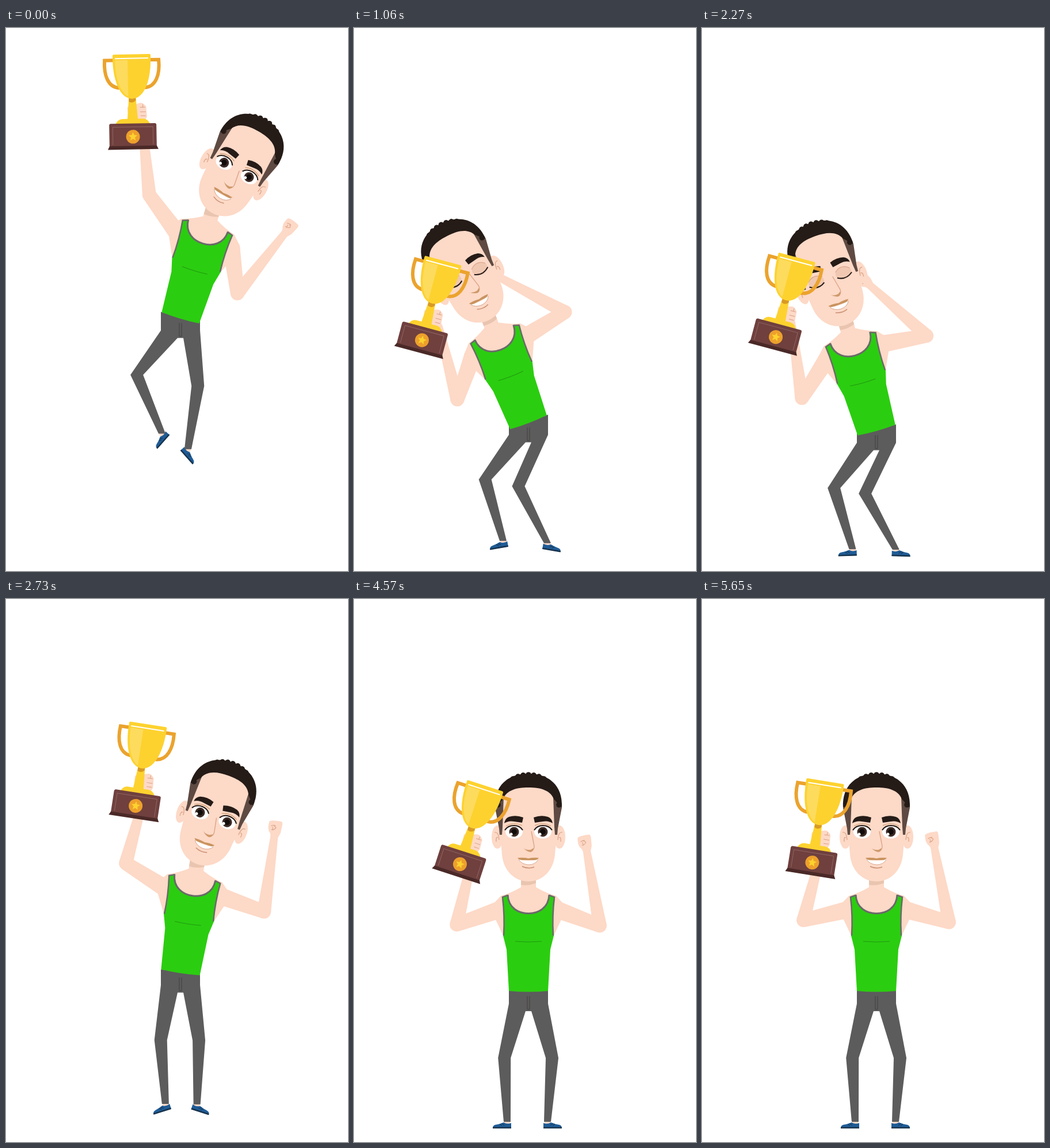
An HTML page with a canvas that plays this animation: 594x942 px, repeating every 5.72 s.

```html
<!DOCTYPE html>
<html lang="en">
<head>
<meta charset="utf-8">
<title>Winner's jump</title>
<style>
  html, body { margin: 0; width: 100%; height: 100%; overflow: hidden; background: #fff; }
  canvas { display: block; width: 594px; height: 942px; }
</style>
</head>
<body>
<canvas id="stage" width="594" height="942"></canvas>
<script>
const ctx = document.getElementById('stage').getContext('2d');
const LOOP = 5720, STEP = 66.5, CYCLE = 18.6, GROUND = 907;
const UPPER_ARM = 79, FOREARM = 145, THIGH = 91, SHIN = 111;
const SKIN = '#fdd9c7', CREASE = '#d9a184', HAIR = '#251b17', FADE = '#5e4a42';
const PANTS = '#5c5c5c', SHIRT = '#2bcd10', TRIM = '#6a6a6a', GOLD = '#fdd22f', ORANGE = '#eba32d';

const ease = {
  in: u => u * u,
  inOut: u => u * u * (3 - 2 * u),
  out: u => 1 - (1 - u) ** 4,
  overshoot: u => 1 + 2.7 * (u - 1) ** 3 + 1.7 * (u - 1) ** 2,
  linear: u => u
};

// Feet are [x, distance below the hip]; knees and elbows follow from limb lengths.
const apex = {
  hip: 493, lean: 18.5, nod: 33, left: [271, 201], right: [315, 229], toes: 50, knee: 1,
  medal: [232, 169], tilt: -2, fist: [501, 340]
};
const fall = {
  hip: 651, lean: 8.5, nod: 19.5, left: [277, 229], right: [332, 229], toes: 17, knee: 1,
  medal: [225, 363], tilt: 9, fist: [467, 400]
};
const stand = {
  hip: 680, lean: 0, nod: 0, left: [266, 227], right: [336, 227], toes: 0, knee: 1,
  medal: [192, 457], tilt: 8.5, fist: [401, 418]
};
const land = {
  ...stand, lean: -2.5, nod: -7, left: [262, 227], right: [343, 227],
  medal: [177, 478], tilt: 15, fist: [398, 434]
};
const ready = { ...stand, medal: [184, 460], tilt: 18, fist: [402, 424] };
const crouch = {
  hip: 684, lean: -21, nod: -27, left: [259, 206], right: [336, 210], toes: 10, knee: -1,
  medal: [118, 542], tilt: 15, fist: [238, 425]
};
const dip = {
  ...crouch, hip: 700, lean: -15, nod: -18, left: [262, 207], right: [337, 207], toes: 0,
  medal: [130, 535], fist: [290, 440]
};
const launch = {
  ...apex, hip: 595, lean: 0, nod: 2, right: [325, 218], toes: 35,
  medal: [112, 375], tilt: 8, fist: [405, 410]
};

const keys = [
  { at: 0, pose: apex },
  { at: 3, pose: fall, by: ease.in },
  { at: 7.1, pose: land, by: ease.overshoot },
  { at: 9.2, pose: stand, by: ease.inOut },
  { at: 12.3, pose: ready, by: ease.inOut },
  { at: 14.4, pose: dip, by: ease.inOut },
  { at: 15.85, pose: crouch, by: ease.inOut },
  { at: 16.8, pose: launch, by: ease.linear },
  { at: CYCLE, pose: apex, by: ease.out }
];

// Steps at which a jump is highest.
const peaks = [-17.6, 1, 18.6, 38, 56.8, 75.3, 93.9];

const rad = deg => deg * Math.PI / 180;
const mix = (a, b, u) => Array.isArray(a) ? a.map((v, n) => mix(v, b[n], u)) : a + (b - a) * u;

function phaseAt(ms) {
  let step = Math.floor((ms + 18) / STEP);
  if (step > 18 && step < 21) step = 18; // the second jump hangs in the air
  const k = peaks.findIndex(p => p > step) - 1;
  return (step - peaks[k]) / (peaks[k + 1] - peaks[k]) * CYCLE;
}

function poseAt(phase) {
  const k = keys.findIndex(key => key.at > phase);
  const from = keys[k - 1], to = keys[k];
  const u = to.by((phase - from.at) / (to.at - from.at));
  return Object.fromEntries(Object.keys(apex).map(name => [name, mix(from.pose[name], to.pose[name], u)]));
}

// Middle joint of a two-part limb; bend gives the side it points to.
function joint([x1, y1], [x2, y2], first, second, bend) {
  const dist = Math.hypot(x2 - x1, y2 - y1);
  const dx = (x2 - x1) / dist, dy = (y2 - y1) / dist;
  const reach = Math.min(dist, first + second);
  const along = (first ** 2 - second ** 2 + reach ** 2) / (2 * reach);
  const off = bend * Math.sqrt(Math.max(0, first ** 2 - along ** 2));
  return [x1 + dx * along + dy * off, y1 + dy * along - dx * off];
}

function turn(x, y, deg) {
  const c = Math.cos(rad(deg)), s = Math.sin(rad(deg));
  return [x * c - y * s, x * s + y * c];
}
const add = (a, b) => [a[0] + b[0], a[1] + b[1]];

const fill = (d, color) => { ctx.fillStyle = color; ctx.fill(new Path2D(d)); };
const line = (d, color, width) => {
  ctx.strokeStyle = color; ctx.lineWidth = width; ctx.stroke(new Path2D(d));
};
const poly = (points, color) => fill('M' + points.map(p => p.join()).join('L') + 'Z', color);
function oval(x, y, rx, ry, color) {
  ctx.fillStyle = color;
  ctx.beginPath();
  ctx.ellipse(x, y, rx, ry, 0, 0, 7);
  ctx.fill();
}
function at([x, y], deg, draw) {
  ctx.save();
  ctx.translate(x, y);
  ctx.rotate(rad(deg));
  draw();
  ctx.restore();
}
function mirrored(draw) {
  for (const side of [-1, 1]) {
    ctx.save();
    ctx.scale(side, 1);
    draw(side);
    ctx.restore();
  }
}

function taper([x1, y1], [x2, y2], w1, w2) {
  const len = Math.hypot(x2 - x1, y2 - y1) || 1;
  const nx = (y1 - y2) / len / 2, ny = (x2 - x1) / len / 2;
  poly([[x1 + nx * w1, y1 + ny * w1], [x2 + nx * w2, y2 + ny * w2],
        [x2 - nx * w2, y2 - ny * w2], [x1 - nx * w1, y1 - ny * w1]], SKIN);
}

// Returns the direction of the forearm in degrees.
function arm(shoulder, hand, bend) {
  const elbow = joint(shoulder, hand, UPPER_ARM, FOREARM, bend);
  const wrist = mix(hand, elbow, 0.08);
  oval(...shoulder, 15, 15, SKIN);
  taper(shoulder, elbow, 30, 24);
  oval(...elbow, 12, 12, SKIN);
  taper(elbow, wrist, 24, 13);
  return Math.atan2(hand[1] - elbow[1], hand[0] - elbow[0]) * 180 / Math.PI;
}

function fist() {
  fill('M-12-11Q-10-15 8-14Q12-14 11-6L10 6Q7 14 5 18L-6 18Q-6 10-10 6Q-14 0-12-11Z', SKIN);
  line('M-8-4Q-3-7 0-5M-7 2Q-2 3 1-2L-3-5M-4 3L-5-3', CREASE, 1);
}

function leg(side, hip, [x, drop], toes, bend) {
  const ankle = [x, Math.min(GROUND, hip + drop)];
  const [kx, ky] = joint([303 + side * 19, hip + 28], ankle, THIGH, SHIN, bend);
  const edge = 303 + side * 34;
  at(ankle, side * toes, () => {
    ctx.scale(side, 1);
    fill('M-5-3H5V5H-5Z', SKIN);
    fill('M-7 2Q0 5 6 1Q13 4 20 5Q25 6 25 11H-7Z', '#1f5c96');
    fill('M-7 9H25V11.5H-7Z', '#17334d');
    line('M5 6L10 3M9 7L13 4', '#17334d', 1);
  });
  poly([[303, hip], [edge, hip], [edge, hip + 22], [kx + side * 11, ky], [x + side * 6, ankle[1]],
        [x - side * 6, ankle[1]], [kx - side * 11, ky], [303 + side * 5, hip + 35], [303, hip + 35]], PANTS);
}

function torso() {
  fill('M-13-205V-180Q-30-170-48-165L-62-150L-59-128L-43-94H43L59-128L62-150L48-165Q30-170 13-180V-205Z', SKIN);
  fill('M-13-203H13V-187Q0-182-13-184Z', '#e9c5b0');
  const neckline = 'M-36-167C-35-143-16-134.5 0-134.5C16-134.5 35-143 36-167';
  fill(neckline + 'L46-163Q41-130 44-96Q41-84 38-72L34 0Q0 3-34 0L-38-72Q-41-84-44-96Q-41-130-46-163Z', SHIRT);
  line(neckline, TRIM, 3);
  mirrored(() => line('M36-166L45-163Q41-130 43-96', TRIM, 2.5));
  line('M-23-86Q0-84 23-86', '#1f9a10', 1);
}

function eye(side, closed) {
  if (closed) {
    oval(25, -85, 14, 11, '#f0c8b2');
    line('M12-80Q25-71 39-81', HAIR, 2);
    line('M12-90Q25-101 38-89', CREASE, 1);
    return;
  }
  oval(25, -84, 15, 11.5, '#fff');
  oval(25, -84, 8.5, 8.5, '#3c2a25');
  oval(25, -84, 5, 5, '#120d0c');
  oval(25 - side * 5, -80, 2.5, 2.5, '#fff');
  line('M10-87Q15-95 25-95Q36-95 41-87', HAIR, 2);
  line('M11-95Q25-102 39-94', '#c99a70', 1.2);
}

function head(closed) {
  mirrored(() => {
    oval(54, -75, 10, 20, SKIN);
    line('M51-70Q52-85 59-83M53-74Q57-76 56-67', CREASE, 1.2);
  });
  fill('M-57-125L-49-80L-46-45C-44-18-25 2 0 2C25 2 44-18 46-45L49-80L57-125Q50-175 0-178Q-50-175-57-125Z', SKIN);
  mirrored(() => fill('M43-146L44-118L45-92L46-79H50L51-90L58-126Z', FADE));
  fill('M58-126L44-141C38-156 22-161 0-161C-22-161-38-156-44-141L-58-126'
     + 'C-60-165-35-185 0-185C35-185 60-165 58-126Z', HAIR);
  for (let n = 0; n <= 18; n++) {
    const a = Math.PI * (1 + n / 18);
    oval(53 * Math.cos(a), -131 + 52 * Math.sin(a), 4.8, 4.8, HAIR);
  }
  mirrored(side => {
    eye(side, closed);
    fill('M9-109Q22-114 34-110Q41-107 42-99Q34-104 25-102L11-100Z', HAIR);
  });
  line('M5-85Q8-70 10-59Q10-52 4-50', CREASE, 1.3);
  fill('M-9-56Q-4-52 4-53L9-56Q8-49 3-49Q-3-50-9-56Z', '#cf9a6c');
  fill('M-19-39Q-8-40 0-38Q8-40 18-39L14-35H-15Z', '#c9935f');
  fill('M-17-36Q0-32 17-36Q12-27 0-27Q-12-28-17-36Z', '#fff');
  line('M-17-36Q-12-28 0-27Q12-27 17-36', '#d09a80', 0.8);
  line('M-11-24Q0-19 10-23', '#c98f70', 1.5);
}

function star(r) {
  poly(Array.from({ length: 10 }, (_, n) => turn(0, n % 2 ? -r * 0.45 : -r, n * 36)), GOLD);
}

function trophy() {
  at([15, -43], 0, () => {
    fill('M-24-6Q-24-11-18-10L-4-15Q2-17 5-13Q10-10 9-4L10 8Q8 14 2 16H-12Q-24 8-24-6Z', SKIN);
    line('M-2-8H7M-2 0H8M-1 7H8M3-13V-8', CREASE, 1);
  });
  mirrored(() => line('M32-133H47C49-108 42-86 22-85', ORANGE, 6));
  fill('M-30-22Q-26-31-18-31H-9L-6-68H6L9-31H18Q26-31 30-22Z', GOLD);
  fill('M-6-68H6V-63Q0-57-6-61Z', '#d99a22');
  fill('M-33-141Q-33-143-31-143H31Q33-143 33-141C34-100 22-66 0-66C-22-66-34-100-33-141Z', GOLD);
  fill('M-29-133H-7L-7-70C-22-78-29-105-29-133Z', '#fddb5d');
  line('M-29-136H29', '#fff', 2);
  fill('M-41-20Q-41-23-38-23H38Q41-23 41-20V18H-41Z', '#6f403e');
  fill('M-41 16H41L44 22H-44Z', '#4a2927');
  line('M-35 14V-17H35V14', '#8f6664', 1);
  oval(0, 0, 12, 12, '#eda02c');
  star(8);
}

function draw(ms) {
  const phase = phaseAt(ms);
  const { hip, lean, nod, left, right, toes, knee, medal, tilt, fist: hand } = poseAt(phase);
  const closed = phase > 13.3 && phase < 16.4;
  const onTorso = (x, y) => add([303, hip], turn(x, y, lean));

  ctx.clearRect(0, 0, 594, 942);
  const aim = arm(onTorso(50, -141), hand, -1);
  at(hand, aim + 90, fist);
  arm(onTorso(-50, -141), add(medal, turn(15, -43, tilt)), 1);

  leg(-1, hip, left, toes, -1);
  leg(1, hip, right, toes, knee);
  const slant = 34 * Math.tan(rad(lean));
  poly([[269, hip - slant], [337, hip + slant], [337, hip + 22], [269, hip + 22]], PANTS);
  line(`M301 ${hip + 9}V${hip + 32}H305V${hip + 9}`, '#453f3e', 1);

  at([303, hip], lean, torso);
  at(onTorso(0, -192), nod, () => head(closed));
  at(medal, tilt, trophy);
}

const start = performance.now();
function tick() {
  draw((performance.now() - start) % LOOP);
  requestAnimationFrame(tick);
}
tick();
</script>
</body>
</html>
```
